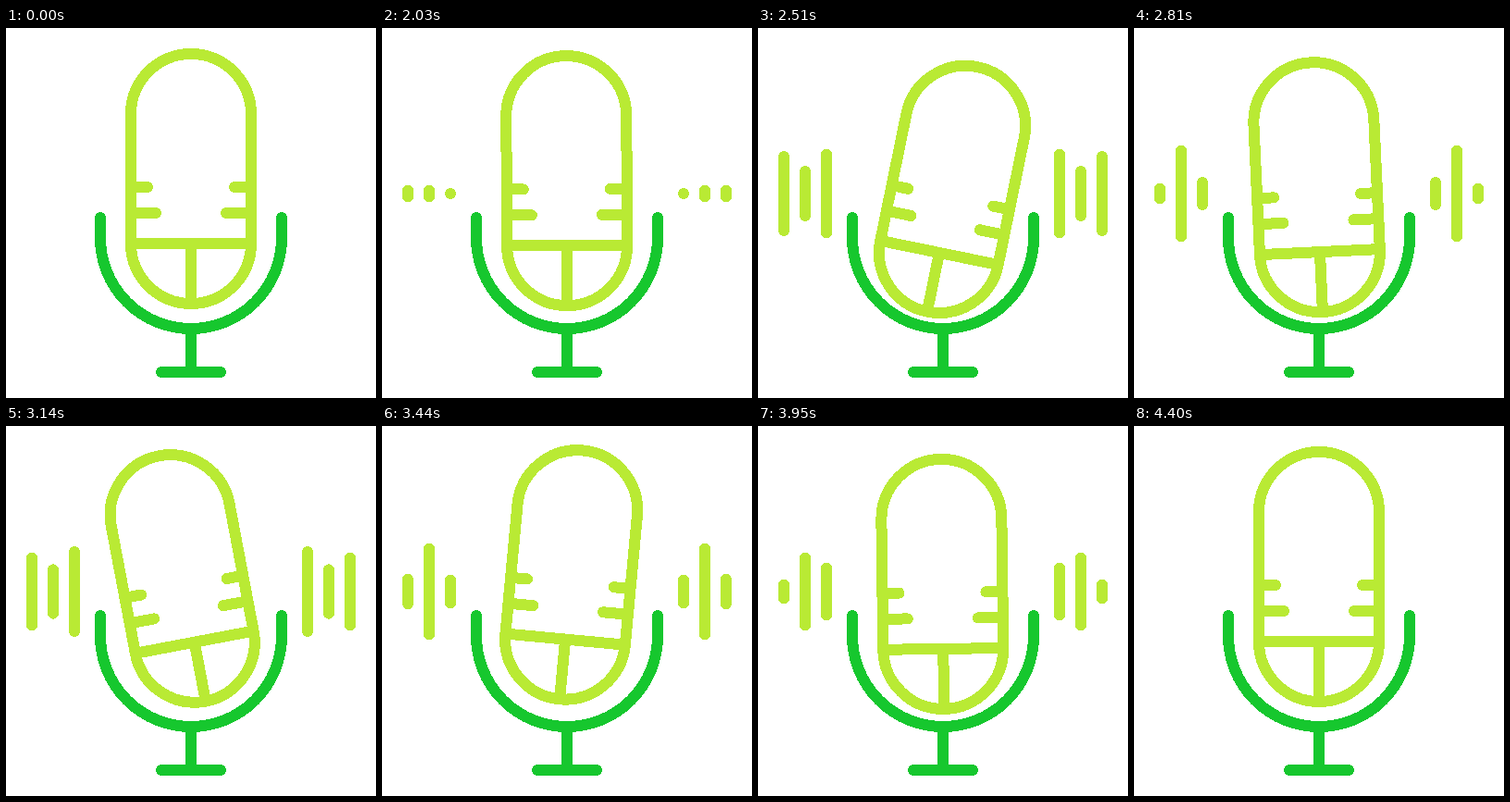
Recreate the animation shown at these times as an HTML page. Size 400 by 400 pixels, loop 4.43 s.

```html
<!DOCTYPE html>
<html lang="en">
<head>
<meta charset="utf-8">
<title>Microphone</title>
<style>
  html, body { margin: 0; width: 100%; height: 100%; overflow: hidden; background: #fff; }
  svg { display: block; width: 100%; height: 100%; shape-rendering: crispEdges; }
  svg * { fill: none; stroke-width: 12; stroke-linecap: round; }
  .lime { stroke: #b9ea34; }
  .green { stroke: #16c72e; }
</style>
</head>
<body>
<svg viewBox="0 0 400 400">
  <g id="bars" class="lime"></g>
  <g id="mic" class="lime">
    <rect x="135" y="28" width="130" height="270" rx="65"/>
    <path d="M135 233H265M200 233V298M135 172H153M135 200H162M265 172H247M265 200H238"/>
  </g>
  <path class="green" d="M102 205V227A98 98 0 0 0 298 227V205M200 325V372M168 372H232"/>
</svg>
<script>
const LOOP = 4430, REST = 2000, ACTIVE = 2400, STEP = 30;

// Each bar and its mirror image swing between mid - swing and mid + swing
const bars = [
  { x: 28, mid: 29, swing: 17.5, peak: 530, period: 550 },
  { x: 51, mid: 41, swing: 11.5, peak: 805, period: 640 },
  { x: 74, mid: 33.5, swing: 15.5, peak: 480, period: 650 }
];

const clamp = v => Math.min(1, Math.max(0, v));
const smooth = v => (v = clamp(v), v * v * (3 - 2 * v));
const wave = (t, peak, period) => Math.cos(2 * Math.PI * (t - peak) / period);

const mic = document.getElementById("mic");
const barGroup = document.getElementById("bars");
for (const bar of bars) {
  bar.path = document.createElementNS("http://www.w3.org/2000/svg", "path");
  barGroup.append(bar.path);
}

function draw(now) {
  const t = Math.max(0, Math.floor((now % LOOP - REST) / STEP) * STEP);
  const start = clamp(t / 140), end = smooth((ACTIVE - t) / 500);

  // The bounces grow deeper over the first 600 ms
  const bounce = 9.2 * smooth(t / 600) * (1 - wave(t, 502, 283));
  const lift = end * (10.5 * start - bounce);
  const tilt = end * smooth(t / 250) * 11.8 * wave(t, 475, 1170);
  mic.setAttribute("transform", `translate(0 ${lift}) rotate(${tilt} 200 213)`);

  for (const { x, mid, swing, peak, period, path } of bars) {
    const half = start * end * (mid + swing * wave(t, peak, period));
    const reach = Math.max(0.01, half - 6);
    const line = `${179 - reach}V${179 + reach}`;
    path.setAttribute("d", `M${x} ${line}M${400 - x} ${line}`);
    path.style.strokeWidth = Math.min(12, 2 * half);
    path.style.display = half > 0.5 ? "" : "none";
  }
}

const begin = performance.now();
function tick() {
  draw(performance.now() - begin);
  requestAnimationFrame(tick);
}
tick();
</script>
</body>
</html>
```
